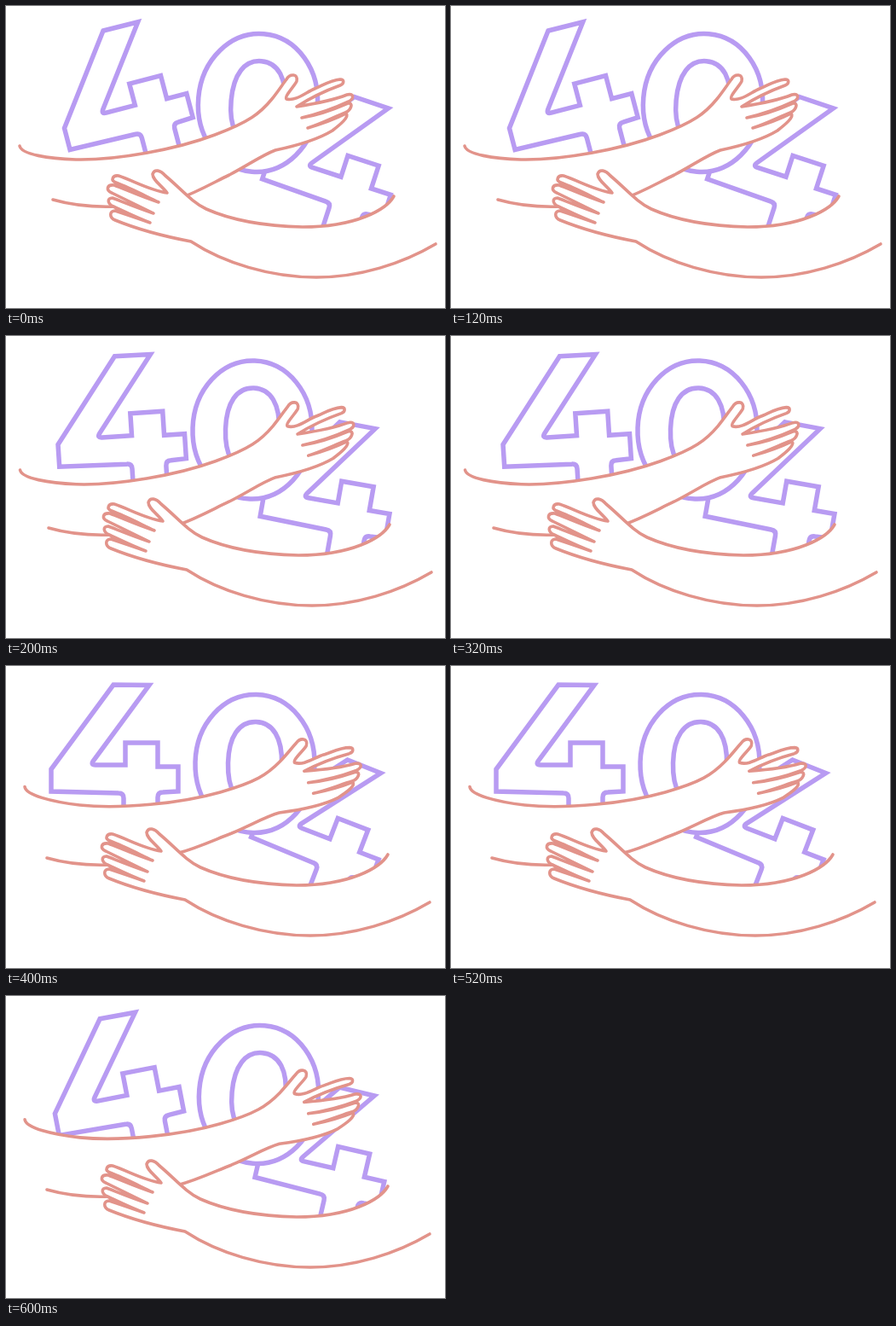
These frames come from a looping animation (515x354 px, 800 ms). An HTML page with a canvas:

```html
<!DOCTYPE html>
<html>
<head>
<meta charset="utf-8">
<title>404</title>
<style>
html, body { margin: 0; height: 100%; overflow: hidden; background: #fff; }
canvas { display: block; }
</style>
</head>
<body>
<canvas id="stage" width="515" height="354"></canvas>
<script>
const ctx = document.getElementById('stage').getContext('2d');
const PURPLE = '#b89bf2', SALMON = '#e2938a';

const four = 'M-2-78L40-77.5L-25.5 11Q-29 16-23 16H12V-10H50V18H74V47L56 48Q50 48 50 54V80H10V55Q10 49 4 49L-75 47V21Z';
const zero = 'M0-81C39-81 70-45 70 0S39 81 0 81S-70 45-70 0S-39-81 0-81Z' +
  'M0-49C20-49 31.5-31 31.5 0S20 49 0 49S-31.5 31-31.5 0S-20-49 0-49Z';
const upperArm = 'M16 164C18 174 50 179 82 180C130 181 200 168 245 151C285 136 298 126 312 109' +
  'C320 99 325 91 329 86C333 79 343 79 341 88C340 92 326 106 329 109' +
  'C340 112 352 101 362 97C370 94 380 87 392 86C397 86 397 91 392 93C370 101 355 109 341 118' +
  'C360 115 385 110 400 104C408 102 409 108 402 112C385 120 365 127 347 131' +
  'C365 128 385 121 401 114C408 113 405 122 398 125C385 130 370 138 354 143' +
  'C368 139 385 133 399 126C403 130 392 139 383 146C365 157 335 165 316 169' +
  'C300 175 285 186 262 198C245 206 225 218 200 227';
const lowerArm = 'M455 223C446 239 410 259 348 259C300 258 262 250 235 238' +
  'C218 230 205 214 187 199C181 192 174 191 172 197C172 204 182 210 189 219' +
  'C168 216 148 204 132 199C125 198 122 205 129 207C145 213 162 222 179 230' +
  'C160 224 140 215 127 210C118 209 117 216 124 219C140 227 157 235 173 243' +
  'C155 237 138 230 125 225C118 225 119 232 126 235C141 242 155 249 169 254' +
  'C155 249 140 244 128 240C121 240 121 248 128 251C150 260 180 269 217 276' +
  'C255 301 310 318 364 318C415 318 465 302 504 279';
const sleeve = 'M55 227C76 233 100 236 128 235';

// Back to front; each pose is [x, y, degrees].
const parts = [
  { d: four, poses: [[386.5, 181.3, 18], [380.2, 178, 10], [374.5, 183.5, 21], [375.7, 183.5, 13]] },
  { d: four, poses: [[135.7, 103.9, -14.7], [134.5, 101.5, -3.7], [128, 100, 0], [127, 103, -11]] },
  { d: zero, poses: [[295.5, 113.5, 5], [289, 110, 2], [292, 114.5, 1.5], [296.5, 115.5, 5]] },
  { d: upperArm, arm: true, close: 'L60 226', poses: [[0, 0, 0], [2.5, -7.2, .7], [20, -23.3, 4.87], [19, -20, 4.5]] },
  { d: sleeve, arm: true, poses: [[0, 0, 0], [-5, -2, 0], [-7, -2, 0], [-7, 0, 0]] },
  { d: lowerArm, arm: true, poses: [[0, 0, 0], [-5, -2, 0], [-7, -2, 0], [-7, 0, 0]] }
].map(p => ({ ...p, line: new Path2D(p.d), body: new Path2D(p.d + (p.close || '')) }));

ctx.fillStyle = '#fff';
ctx.lineCap = 'round';

function draw(now) {
  const step = Math.floor(now / 200) % 4;
  ctx.fillRect(0, 0, 515, 354);
  for (const { line, body, arm, poses } of parts) {
    const [x, y, deg] = poses[step];
    ctx.save();
    ctx.translate(x, y);
    ctx.rotate(deg * Math.PI / 180);
    ctx.fill(body);
    ctx.strokeStyle = arm ? SALMON : PURPLE;
    ctx.lineWidth = arm ? 3.6 : 5.5;
    ctx.lineJoin = arm ? 'round' : 'miter';
    ctx.stroke(line);
    ctx.restore();
  }
}

const start = performance.now();
function tick() {
  draw(performance.now() - start);
  requestAnimationFrame(tick);
}
tick();
</script>
</body>
</html>
```
